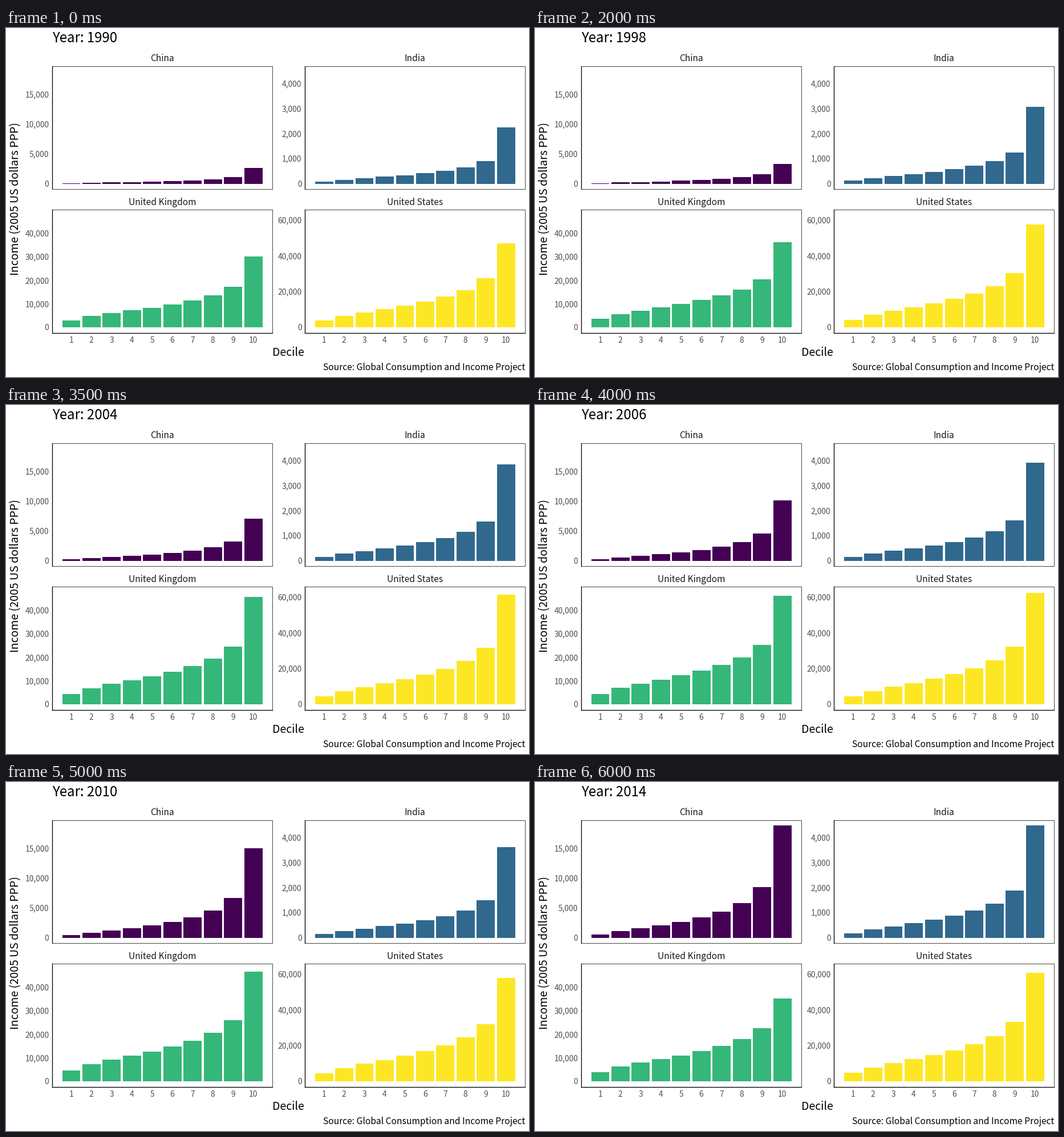
A matplotlib script for the animation above (6250 ms loop, 917 by 611 pixels).

```python
import numpy as np
import matplotlib.pyplot as plt
from matplotlib.animation import FuncAnimation
from matplotlib.patches import Rectangle

W, H, DPI = 917, 611, 64
FRAMES, INTERVAL = 25, 250
PANEL_W, PANEL_H = 386.2, 215.5
MARGIN = PANEL_H / 22
LEFTS, TOPS = (81, 524.1), (66.8, 318.3)
STEP = PANEL_W / 10.89
BAR_W = 0.9 * STEP
FIRST_YEAR, KNOT_GAP = 1990, 4
GREY = "#4d4d4d"

plt.rcParams["font.family"] = ["Noto Sans CJK JP", "DejaVu Sans"]

# top: income of the richest decile in thousands, one point every four years
# link: ninth decile = factor * top ** power, factor drifting over the loop
# spread: exponent of the log-logistic curve through the lower deciles
COUNTRIES = [
    dict(name="China", color="#440154", scale=10.43, ticks=(5000, 4),
         top=(2.62, 1.63, 3.3, 4.35, 10.15, 15, 18.8),
         link=(0.8, 0.5, 0.81), spread=0.60),
    dict(name="India", color="#31688E", scale=43.95, ticks=(1000, 5),
         top=(2.24, 2.45, 3.06, 3.65, 3.9, 3.61, 4.47),
         link=(1, 0.398, 0.418), spread=0.50),
    dict(name="United Kingdom", color="#35B779", scale=4.12, ticks=(10000, 5),
         top=(30.1, 33, 36.2, 44.2, 46.2, 46.7, 35.1),
         link=(0.6, 2.22, 2.67), spread=0.37),
    dict(name="United States", color="#FDE725", scale=3.135, ticks=(20000, 4),
         top=(46.9, 51.7, 57.4, 59.3, 62.2, 57.7, 60.6),
         link=(0.3, 8.6, 9.66), spread=0.42),
]

rank = (np.arange(10) + 0.5) / 10
ODDS = rank / (1 - rank)


def smooth(knots, t):
    """Cubic interpolation between evenly spaced points."""
    slope = np.gradient(knots)
    k = min(int(t), len(knots) - 2)
    u = t - k
    return ((1 + 2 * u) * (1 - u) ** 2 * knots[k]
            + u * (1 - u) ** 2 * slope[k]
            + u * u * (3 - 2 * u) * knots[k + 1]
            + u * u * (u - 1) * slope[k + 1])


def incomes(country, i):
    top = smooth(country["top"], i / KNOT_GAP)
    power, start, end = country["link"]
    factor = start + (end - start) * i / (FRAMES - 1)
    values = factor * top ** power * (ODDS / ODDS[8]) ** country["spread"]
    values[9] = top
    return values


fig = plt.figure(figsize=(W / DPI, H / DPI), dpi=DPI, facecolor="white")
ax = fig.add_axes([0, 0, 1, 1])
ax.set_xlim(0, W)
ax.set_ylim(H, 0)
ax.axis("off")


def label(x, y, s, px, ha="center", color="black", **kw):
    return ax.text(x, y, s, fontsize=px * 72 / DPI, ha=ha, va="baseline",
                   color=color, **kw)


def line(xs, ys):
    ax.plot(xs, ys, color="black", lw=1.3 * 72 / DPI, zorder=4)


def draw_panel(country, left, top):
    bottom = top + PANEL_H
    base = bottom - MARGIN
    lower = top == TOPS[1]
    ax.add_patch(Rectangle((left, top), PANEL_W, PANEL_H, fill=False,
                           ec="#333333", lw=0.9 * 72 / DPI, zorder=3))
    line([left, left], [top, bottom])
    if lower:
        line([left, left + PANEL_W], [bottom, bottom])
    label(left + PANEL_W / 2, top - 8.7, country["name"], 15.6,
          color="#1a1a1a")

    step, count = country["ticks"]
    for v in range(0, step * count, step):
        label(left - 5.7, base - v / 1000 * country["scale"] + 5.2, f"{v:,}",
              13.8, ha="right", color=GREY)

    bars = []
    for d in range(10):
        x = left + (0.945 + d) * STEP
        bar = Rectangle((x - BAR_W / 2, base), BAR_W, 0,
                        fc=country["color"], lw=0)
        bars.append(ax.add_patch(bar))
        if lower:
            label(x - 0.3, 551.2, str(d + 1), 13.8, color=GREY)
    return bars


panels = [(c, draw_panel(c, LEFTS[n % 2], TOPS[n // 2]))
          for n, c in enumerate(COUNTRIES)]
title = label(80.8, 25, "", 24, ha="left")
label(494.9, 574.5, "Decile", 19.5)
label(22, 299, "Income (2005 US dollars PPP)", 19.5,
      rotation=90, rotation_mode="anchor")
label(909.9, 599, "Source: Global Consumption and Income Project", 15.65,
      ha="right")


def update(i):
    title.set_text(f"Year: {FIRST_YEAR + i}")
    for country, bars in panels:
        for bar, v in zip(bars, incomes(country, i)):
            bar.set_height(-v * country["scale"])
    return []


anim = FuncAnimation(fig, update, frames=FRAMES, interval=INTERVAL,
                     repeat=True, repeat_delay=0, blit=False)
plt.show()
```
